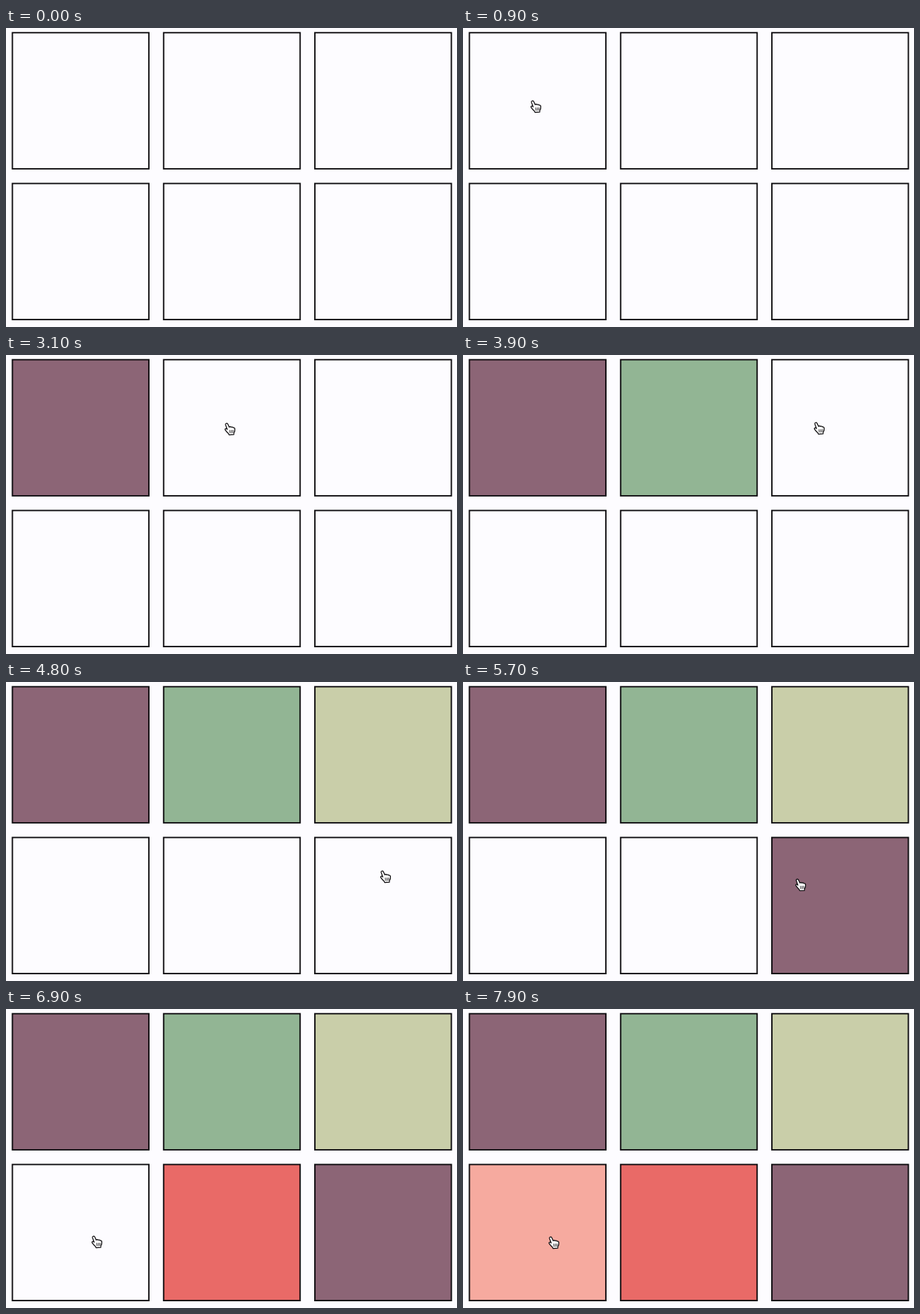
Recreate the animation shown at these times as an HTML page with a canvas. Size 600 px wide and 399 px high, loop 8 s.

```html
<!DOCTYPE html>
<html lang="en">
<head>
<meta charset="utf-8">
<title>Colour boxes</title>
<style>
  html, body { margin: 0; width: 100%; height: 100%; overflow: hidden; background: #fdfcff; }
  canvas { display: block; width: 600px; height: 399px; }
</style>
</head>
<body>
<canvas id="stage" width="600" height="399"></canvas>
<script>
const ctx = document.getElementById('stage').getContext('2d');
const LOOP = 8000, TICK = 100;
const PAPER = '#fdfcff', INK = '#0c0a0d';
const PITCH = 201.2, SIZE = 181.6;

// column, row, click time, fill colour
const boxes = [
  [0, 0, 2400, '#8c6576'],
  [1, 0, 3400, '#92b594'],
  [2, 0, 4400, '#c9cea9'],
  [0, 1, 7400, '#f6aa9f'],
  [1, 1, 6300, '#e96a67'],
  [2, 1, 5400, '#8c6576']
];

// first tick, last tick, end x, end y
const START = [300, 227];
const moves = [
  [500, 900, 97, 105],
  [2300, 2300, 93, 105],
  [2800, 3100, 298, 99],
  [3500, 3900, 474, 98],
  [4500, 4800, 505, 260],
  [5700, 5900, 290, 302],
  [6600, 6900, 121, 311],
  [7900, 7900, 121, 312]
];

const hand = new Path2D(
  'M-6 -6.1C-6.1 -7.9 -3.9 -8.5 -3 -7L-1 -2.7C-.2 -3.7 1.1 -3.4 1.6 -2.6' +
  'C2.4 -3.3 3.7 -3 4.1 -2C5.2 -2.5 6.4 -1.6 6.5 -.3C6.7 2.1 6.2 3.6 5.2 5' +
  'L5 7.2L-1.2 7.6L-2.1 5.8C-3.6 4.5 -5.2 2.6 -6.4 .8' +
  'C-7.1 -.3 -5.8 -1.4 -4.7 -.6L-3.7 .2Z');
const creases = new Path2D('M-.3 1.6L0 5M1.9 1.5L2 4.9M4 1.4L3.9 4.7');

const ease = p => p * p * (3 - 2 * p);

function cursorAt(t) {
  let [x, y] = START;
  for (const [from, to, endX, endY] of moves) {
    if (t < from) break;
    const p = ease(Math.min(1, (t - from + TICK) / (to - from + TICK)));
    x += (endX - x) * p;
    y += (endY - y) * p;
  }
  return [x, y];
}

function drawBox([col, row, at, color], t) {
  const x = 8.5 + col * PITCH, y = 6.3 + row * PITCH;
  ctx.fillStyle = t >= at ? color : PAPER;
  ctx.fillRect(x, y, SIZE, SIZE);
  ctx.strokeStyle = INK;
  ctx.lineWidth = 1.8;
  ctx.strokeRect(x, y, SIZE, SIZE);
}

function drawHand(x, y) {
  ctx.save();
  ctx.translate(x, y);
  ctx.lineJoin = ctx.lineCap = 'round';
  ctx.strokeStyle = INK;
  ctx.fillStyle = '#fff';
  ctx.lineWidth = 1.2;
  ctx.fill(hand);
  ctx.stroke(hand);
  ctx.lineWidth = 0.8;
  ctx.stroke(creases);
  ctx.restore();
}

function draw(time) {
  const t = Math.floor((time % LOOP) / TICK) * TICK;
  ctx.fillStyle = PAPER;
  ctx.fillRect(0, 0, 600, 399);
  for (const box of boxes) drawBox(box, t);
  if (t >= 400) drawHand(...cursorAt(t));
}

const began = performance.now();
function loop() {
  draw(performance.now() - began);
  requestAnimationFrame(loop);
}
loop();
</script>
</body>
</html>
```
